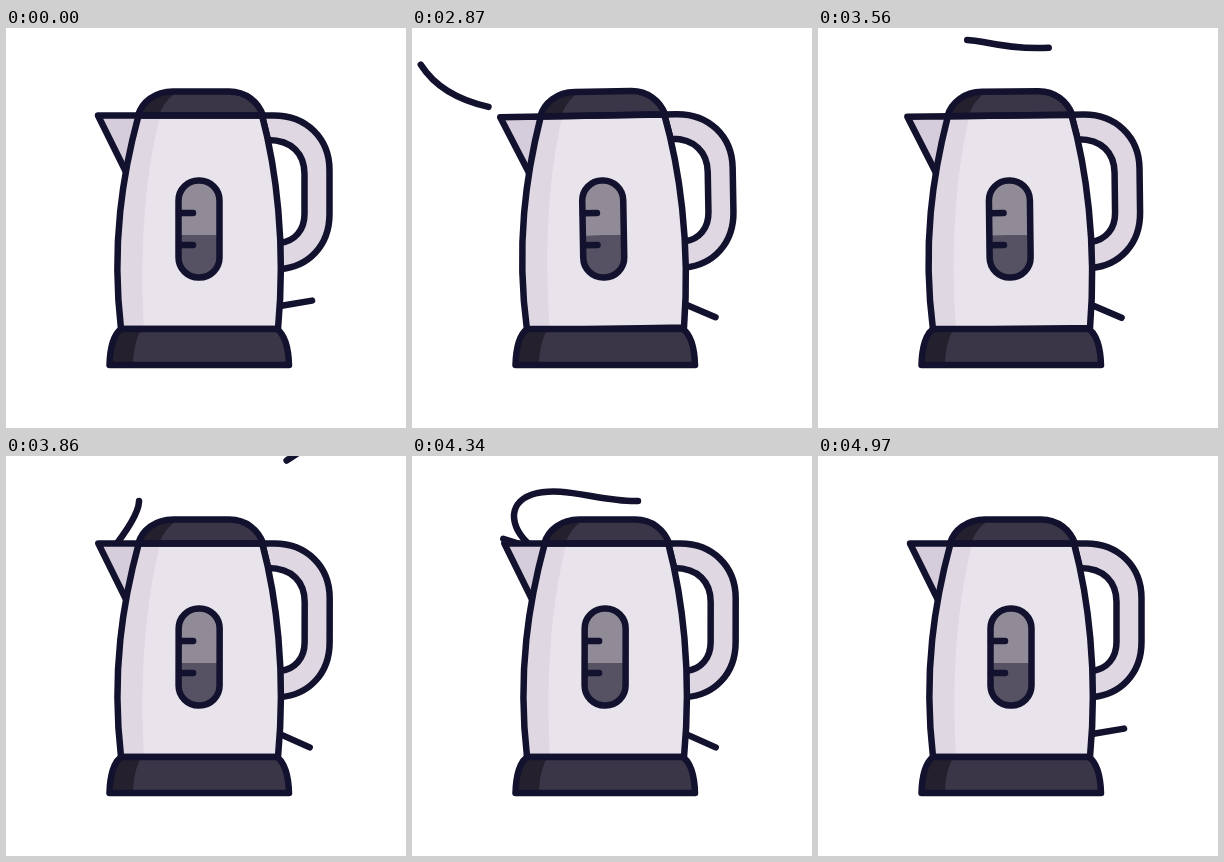
These frames come from a looping animation (400 by 400 pixels, 5660 ms). An HTML page:

```html
<!DOCTYPE html>
<html lang="en">
<head>
<meta charset="utf-8">
<title>Kettle</title>
<style>
  html, body { margin: 0; width: 100%; height: 100%; overflow: hidden; background: #fff; }
  svg { display: block; width: 100vw; height: 100vh; }
  .line { fill: none; stroke: #12122f; stroke-width: 6.5; stroke-linecap: round; stroke-linejoin: round; }
</style>
</head>
<body>
<svg viewBox="0 0 400 400">
  <defs>
    <path id="bodyShape" d="M132.500 87.500C117 145 105 215 115 301H272C280 215 270 140 256 87.500Z"/>
    <path id="lidShape" d="M132 87.500C136 74 149 63.500 167 63.500H223C240 63.500 252 74 257 87.500Z"/>
    <path id="baseShape" d="M103.500 337C104 320 107 307 115 301H271C279 307 282.500 320 283 337Z"/>
    <rect id="windowShape" x="172.500" y="152.500" width="41" height="97" rx="20"/>
    <clipPath id="bodyClip"><use href="#bodyShape"/></clipPath>
    <clipPath id="lidClip"><use href="#lidShape"/></clipPath>
    <clipPath id="baseClip"><use href="#baseShape"/></clipPath>
    <clipPath id="windowClip"><use href="#windowShape"/></clipPath>
  </defs>

  <g id="steam"></g>

  <g id="kettle">
    <path id="lever" class="line" d="M274 278H306.500"/>
    <path class="line" style="fill:#dfd8e3" d="M256 87.500H268C300 87.500 323.500 110 323.500 142V186C323.500 218 302 239 274 241V215C289 213 298.500 202 298.500 186V146C298.500 126 286 112 262 112Z"/>
    <path class="line" style="fill:#d6cddc" d="M134 87.500H92L120 144Z"/>

    <use href="#bodyShape" fill="#e9e4ec"/>
    <path clip-path="url(#bodyClip)" fill="#dfd8e3" d="M100 80H156C140 140 133 215 138 302H100Z"/>
    <use href="#lidShape" fill="#3b3548"/>
    <path clip-path="url(#lidClip)" fill="#24202d" d="M120 60H180C166 65 157 75 153 88H120Z"/>
    <use href="#lidShape" class="line"/>
    <use href="#bodyShape" class="line"/>

    <g clip-path="url(#windowClip)">
      <path fill="#918b98" d="M170 150h46v57h-46z"/>
      <path fill="#575263" d="M170 207h46v45h-46z"/>
    </g>
    <use href="#windowShape" class="line"/>
    <path class="line" d="M173 185H187M173 217H187"/>
  </g>

  <use href="#baseShape" fill="#3b3548"/>
  <path clip-path="url(#baseClip)" fill="#24202d" d="M98 298H137C130 310 127 322 127 340H98Z"/>
  <use href="#baseShape" class="line"/>
</svg>

<script>
  const LOOP = 5660, STEP = 30;
  const LEVER_UP = -9.5, LEVER_DOWN = 24, OVERSHOOT = 7.5;

  const leftWisp = "M110 89Q94 83 77 79C50 73 25 62 9 37Q0 24 -8 8";
  const wisps = [
    { start: 2610, speed: 0.45, length: 82, d: leftWisp },
    { start: 2931, speed: 0.45, length: 82, d: "M100 92Q78 70 60 50C46 36 40 18 41 0V-20" },
    { start: 3098, speed: 0.45, length: 82, d: "M134 93Q110 75 104 55Q101 43 104 31C110 14 135 8 165 14S245 27 278 6Q292 -2 320 -24" },
    { start: 3731, speed: 0.45, length: 82, d: "M105 95Q132 61 133 46Q134 25 122 -12" },
    { start: 4042, speed: 0.6, length: 185, d: "M124 94C98 75 93 48 120 38.500C150 29 185 45 223 45C275 45 350 48 366 -8" },
    { start: 4296, speed: 0.45, length: 82, d: leftWisp }
  ];

  const byId = id => document.getElementById(id);
  const kettle = byId("kettle"), lever = byId("lever");

  for (const wisp of wisps) {
    wisp.path = document.createElementNS("http://www.w3.org/2000/svg", "path");
    wisp.path.setAttribute("d", wisp.d);
    wisp.path.setAttribute("class", "line");
    wisp.path.setAttribute("stroke-dasharray", `${wisp.length} 2000`);
    byId("steam").append(wisp.path);
    wisp.total = wisp.path.getTotalLength();
  }

  const clamp01 = x => Math.min(1, Math.max(0, x));

  // Swings past the goal, then settles back on it.
  function flip(t, start, from, to) {
    const past = to + Math.sign(to - from) * OVERSHOOT;
    return from + (past - from) * clamp01((t - start) / 240)
                + (to - past) * clamp01((t - start - 240) / 90);
  }

  function leverAngle(t) {
    return t < 4640 ? flip(t, 2000, LEVER_UP, LEVER_DOWN)
                    : flip(t, 4640, LEVER_DOWN, LEVER_UP);
  }

  function shakeAngle(t) {
    return t >= 2570 && t < 4820 ? -1.08 * Math.cos(2 * Math.PI * (t - 2875) / 96) : 0;
  }

  function draw(time) {
    const t = 2000 + Math.floor((time - 2000) / STEP) * STEP;
    kettle.setAttribute("transform", `rotate(${shakeAngle(t)} 192 300)`);
    lever.setAttribute("transform", `rotate(${leverAngle(t)} 274 278)`);
    for (const { path, start, speed, length, total } of wisps) {
      const head = (t - start) * speed;
      const visible = head > 0 && head - length < total;
      path.setAttribute("visibility", visible ? "visible" : "hidden");
      path.setAttribute("stroke-dashoffset", length - head);
    }
  }

  const origin = performance.now();
  function tick() {
    draw((performance.now() - origin) % LOOP);
    requestAnimationFrame(tick);
  }
  tick();
</script>
</body>
</html>
```
